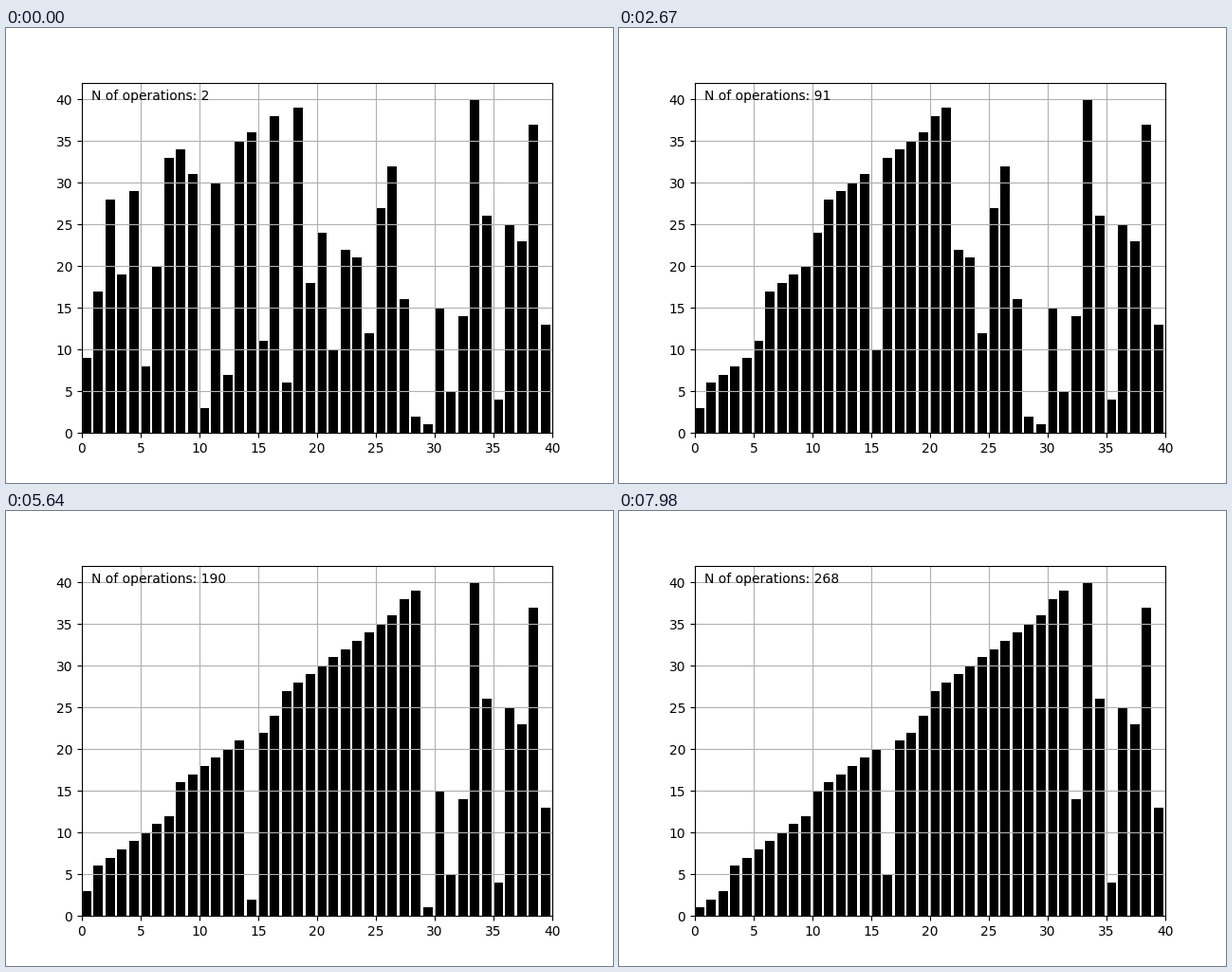
A matplotlib script that plays this animation: 640 by 480 pixels, repeating every 8 s.

```python
from itertools import islice

import matplotlib.pyplot as plt
from matplotlib.animation import FuncAnimation

LOOP_MS = 8000
FRAMES = 267
FIRST_OP = 2

# Unsorted input; every later state follows from the sort itself.
HEIGHTS = [9, 17, 28, 19, 29, 8, 20, 33, 34, 31, 3, 30, 7, 35, 36, 11, 38, 6, 39, 18,
           24, 10, 22, 21, 12, 27, 32, 16, 2, 1, 15, 5, 14, 40, 26, 4, 25, 23, 37, 13]


def insertion_sort(values):
    """Yield the list before sorting and after every swap."""
    a = list(values)
    yield a[:]
    for i in range(1, len(a)):
        j = i
        while j > 0 and a[j] < a[j - 1]:
            a[j], a[j - 1] = a[j - 1], a[j]
            j -= 1
            yield a[:]


states = list(islice(insertion_sort(HEIGHTS), FRAMES))
n = len(HEIGHTS)

fig, ax = plt.subplots(figsize=(6.4, 4.8), dpi=100)
bars = ax.bar(range(n), HEIGHTS, align="edge", color="black")
ax.set_xlim(0, n)
ax.set_ylim(0, 1.05 * n)
ax.grid(True)
label = ax.text(0.02, 0.95, "", transform=ax.transAxes)


def update(frame):
    for bar, height in zip(bars, states[frame]):
        bar.set_height(height)
    label.set_text(f"N of operations: {frame + FIRST_OP}")
    return [*bars, label]


def init():
    return update(0)


anim = FuncAnimation(fig, update, frames=FRAMES, init_func=init,
                     interval=LOOP_MS / FRAMES, repeat=True, repeat_delay=0,
                     blit=False)
plt.show()
```
